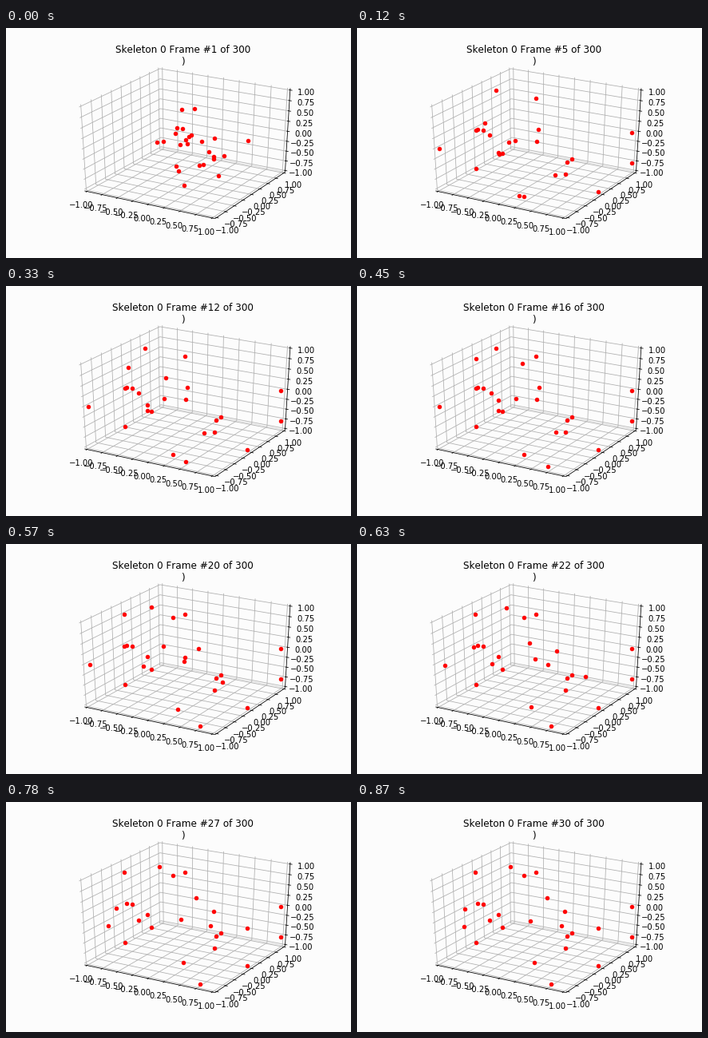
These frames come from a looping animation (432x288 px, 0.9 s). A matplotlib script:

```python
import numpy as np
import matplotlib.pyplot as plt
from matplotlib.animation import FuncAnimation
from matplotlib.collections import LineCollection

W, H, DPI = 432, 288, 72
FRAMES, INTERVAL = 30, 30
PAPER = "#fcfcfc"
EDGE = 1 + 1 / 24          # the box reaches a little past the limits
DELTA = 1 / 6
TICKS = np.linspace(-1, 1, 9)

# Camera at azimuth -60, elevation 30, distance 10
AZ, EL, DIST = np.radians(-60), np.radians(30), 10
NORMAL = np.array([np.cos(AZ) * np.cos(EL), np.sin(AZ) * np.cos(EL), np.sin(EL)])
RIGHT = np.array([-np.sin(AZ), np.cos(AZ), 0])
UP = np.cross(NORMAL, RIGHT)

plt.rcParams["font.family"] = "DejaVu Sans"
plt.rcParams["text.kerning_factor"] = 6      # whole-pixel kerning


def project(p):
    """Data point to stage pixels, y pointing down."""
    p = np.asarray(p, float) / 2
    f = 1 / (DIST - p @ NORMAL)
    x = (p @ RIGHT * f + 0.095) / 0.185
    y = (p @ UP * f + 0.095) / 0.185
    return 54 + 334.8 * x, 252 - 217.44 * y


def with_value(p, axis, value):
    q = list(p)
    q[axis] = value
    return q


def ease(k, begin, end):
    s = np.clip((k - begin) / (end - begin), 0, 1)
    return s * s * (3 - 2 * s)


# Joints that rest once the cluster has burst apart
held = [(269, 164), (344, 131), (344, 169), (302, 205), (261, 183), (149, 176),
        (263, 168), (182, 157), (151, 127), (158, 128), (224, 88)]

# Joints that drift on from one place to another, by time window
drifts = {
    (3, 18): [((160, 119), (148, 88)), ((202, 210), (243, 228)),
              ((190, 144), (209, 92)), ((178, 158), (177, 141))],
    (14, 25): [((174, 78), (192, 81)), ((209, 211), (222, 201)),
               ((227, 127), (260, 137)), ((248, 184), (302, 158)),
               ((198, 141), (256, 155)), ((166, 134), (238, 120)),
               ((177, 156), (166, 148))],
    (17, 30): [((103, 151), (135, 156)), ((149, 128), (135, 134)),
               ((225, 142), (217, 149))],
}

moves = [(p, p, 0, 1) for p in held]
moves += [(a, b, *window) for window, group in drifts.items() for a, b in group]
first = np.array([m[0] for m in moves], float)
last = np.array([m[1] for m in moves], float)
begin, end = np.array([m[2:] for m in moves], float).T

# The opening cluster: the spread pose drawn together and shaken a little
rng = np.random.default_rng(4)
cluster = (237, 145) + (first - (210, 146)) * (0.38, 0.66) + rng.normal(0, 9, first.shape)


def pose(k):
    spread = first + (last - first) * ease(k, begin, end)[:, None]
    pull = max(0, 1 - k / 4) ** 2.5
    return spread + (cluster - spread) * pull


fig = plt.figure(figsize=(W / DPI, H / DPI), dpi=DPI, facecolor=PAPER)
ax = fig.add_axes([0, 0, 1, 1])
ax.set_xlim(0, W)
ax.set_ylim(H, 0)
ax.axis("off")


def lines(segments, color, width, z):
    pixels = [[project(p) for p in seg] for seg in segments]
    ax.add_collection(LineCollection(pixels, colors=color, linewidths=width, zorder=z),
                      autolim=False)


BACK = [-EDGE, EDGE, -EDGE]    # corner where the three rear planes meet

# Each axis: its index, one end of its line, tick direction and tick sign
AXES = [
    (0, [-EDGE, -EDGE, -EDGE], 1, 1),
    (1, [EDGE, EDGE, -EDGE], 0, -1),
    (2, [EDGE, EDGE, -EDGE], 0, -1),
]

# Faint seam between the floor and the rear wall
lines([[BACK, with_value(BACK, 0, EDGE)]], "#dcdcdc", 1, 0.5)

for axis, corner, side, sign in AXES:
    grid, marks = [], []
    for v in TICKS:
        mid = with_value(BACK, axis, v)
        a, b = (axis + 1) % 3, (axis + 2) % 3
        grid.append([with_value(mid, a, -mid[a]), mid, with_value(mid, b, -mid[b])])

        foot = with_value(corner, axis, v)
        marks.append([with_value(foot, side, foot[side] + 0.1 * sign * DELTA),
                      with_value(foot, side, foot[side] - 0.2 * sign * DELTA)])

        spot = np.array(foot) + DELTA * np.sign(foot)
        spot[axis] = v
        ax.text(*project(spot), f"{v:.2f}".replace("-", "\u2212"),
                size=10, ha="center", va="top", zorder=4)
    lines(grid, "#b0b0b0", 0.8, 1)
    lines([[corner, with_value(corner, axis, -corner[axis])]], "black", 0.8, 2)
    lines(marks, "black", 0.8, 3)

joints = ax.scatter(*pose(0).T, s=20, c="red", linewidths=1, zorder=5)
title = ax.text(221.4, 46, "", size=12, ha="center", va="baseline", zorder=6)


def draw(k):
    joints.set_offsets(pose(k))
    title.set_text(f"Skeleton 0 Frame #{k + 1} of 300\n)")
    return joints, title


anim = FuncAnimation(fig, draw, frames=FRAMES, interval=INTERVAL, repeat=True,
                     repeat_delay=0)
plt.show()
```
